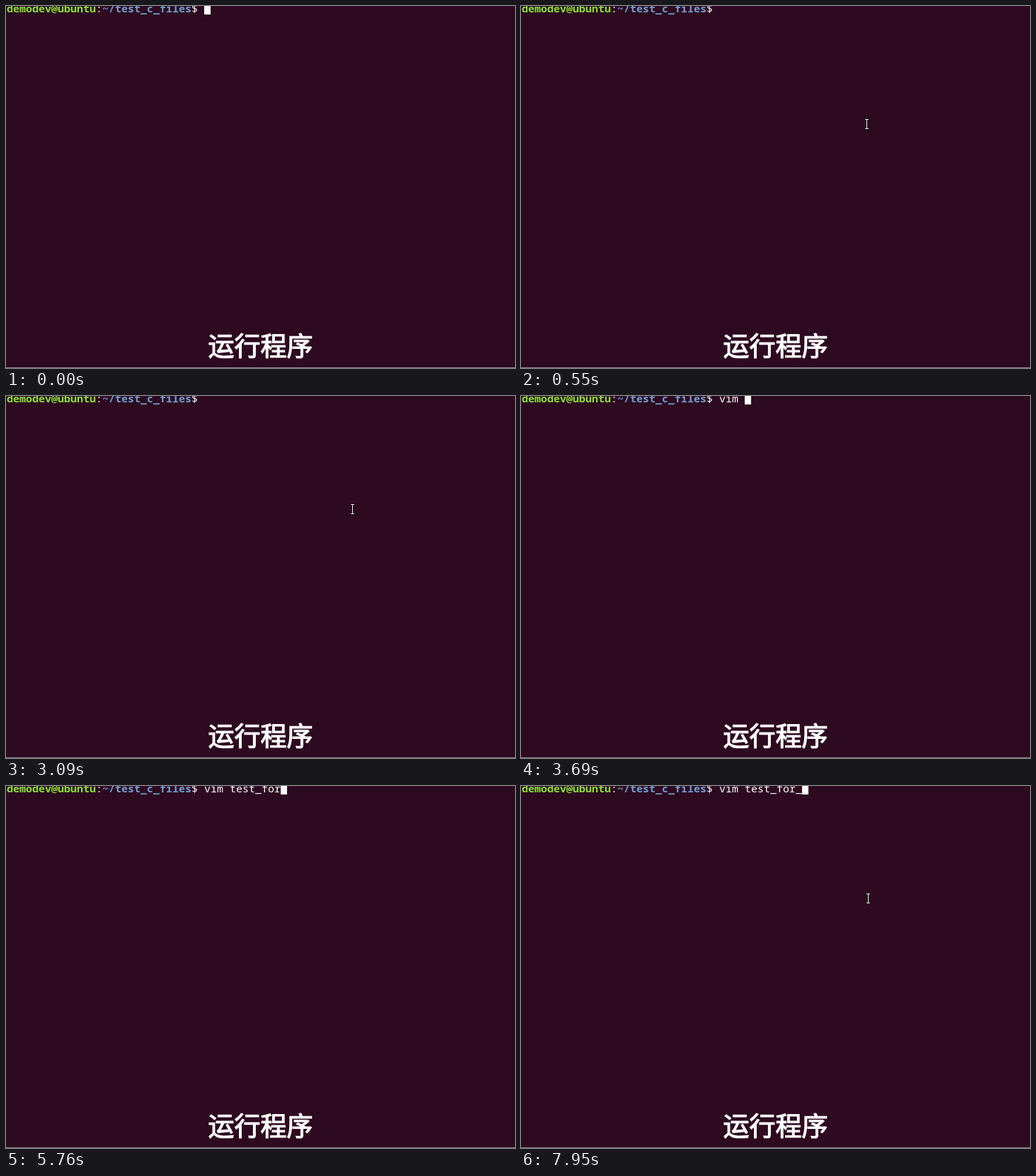
Animation, 719 px wide and 512 px high, one loop 8000 ms. Source, as an HTML page:

```html
<!DOCTYPE html>
<html lang="zh">
<head>
<meta charset="utf-8">
<title>Terminal</title>
<style>
  html, body { margin: 0; width: 100%; height: 100%; overflow: hidden; background: #2d0a20; }
  svg { display: block; }
  text { white-space: pre; fill: #fff; }
  .term { font: 15px "Noto Sans Mono", "DejaVu Sans Mono", monospace; }
  .user { fill: #8ae234; font-weight: bold; }
  .path { fill: #729fcf; font-weight: bold; }
  .caption { font: 37px "Noto Sans CJK SC", "Noto Sans CJK", sans-serif; stroke: #fff; stroke-width: 1.2px; }
</style>
</head>
<body>
<svg width="719" height="512" viewBox="0 0 719 512">
  <rect y="511" width="719" height="1" fill="#8f8690"/>
  <g class="term">
    <text x="1" y="9"><tspan class="user">demodev@ubuntu</tspan>:<tspan class="path">~/test_c_files</tspan>$</text>
    <text id="typed" x="280" y="9"></text>
  </g>
  <rect id="block" width="9" height="12" fill="#fff"/>
  <text class="caption" x="285.5" y="494.5">运行程序</text>
  <g id="pointer" fill="none" shape-rendering="crispEdges">
    <path d="M-3 -6.5H4M-3 6.5H4M.5 -7V7" stroke="#10040c" stroke-width="3"/>
    <path d="M-2 -6.5H3M-2 6.5H3M.5 -6V7" stroke="#fff"/>
  </g>
</svg>
<script>
const LOOP = 8000, CELL = 9, START = 280, BLINK = 603, STEP = 70;

// Keys come in bursts with an even gap
const burst = (start, text, gap = 0) => [...text].map((char, i) => ({ char, at: start + i * gap }));
const keys = [
  ...burst(3290, "vim ", 133), ...burst(4350, "test", 105), ...burst(5090, "_"),
  ...burst(5560, "for", 100), ...burst(6740, "_")
];

// Pointer glides; "via" bends the path
const glides = [
  { start: 130, end: 550, from: [648, 505], via: [426, 204], to: [488, 167] },
  { start: 1690, end: 1750, from: [488, 168], to: [489, 168] },
  { start: 2370, end: 2490, from: [489, 167], to: [489, 165] },
  { start: 2760, end: 3090, from: [489, 164], to: [489, 160] },
  { start: 6550, end: 6740, from: [489, 162], to: [490, 159] }
];

const [typed, block, pointer] = ["typed", "block", "pointer"].map(id => document.getElementById(id));
const show = (el, on) => el.setAttribute("visibility", on ? "visible" : "hidden");
const mix = (a, b, u) => a + (b - a) * u;

function pointAt({ start, end, from, via, to }, t) {
  const stepped = Math.floor((t - start) / STEP) * STEP;
  const u = t >= end ? 1 : stepped / (end - start);
  return from.map((a, i) => {
    const bend = via ? via[i] : mix(a, to[i], 0.5);
    return Math.round(mix(mix(a, bend, u), mix(bend, to[i], u), u));
  });
}

function draw(t) {
  const pressed = keys.filter(key => key.at <= t);
  const lastKey = pressed.length ? pressed.at(-1).at : -263;
  typed.textContent = pressed.map(key => key.char).join("");

  // Each key restarts the blink
  block.setAttribute("x", START + pressed.length * CELL);
  show(block, Math.floor((t - lastKey) / BLINK) % 2 === 0);

  // Typing hides the pointer until it moves again
  const glide = glides.findLast(({ start }) => start <= t);
  show(pointer, glide && lastKey <= glide.end);
  if (glide) pointer.setAttribute("transform", `translate(${pointAt(glide, t)})`);
}

const begin = performance.now();
function frame() {
  draw((performance.now() - begin) % LOOP);
  requestAnimationFrame(frame);
}
frame();
</script>
</body>
</html>
```
